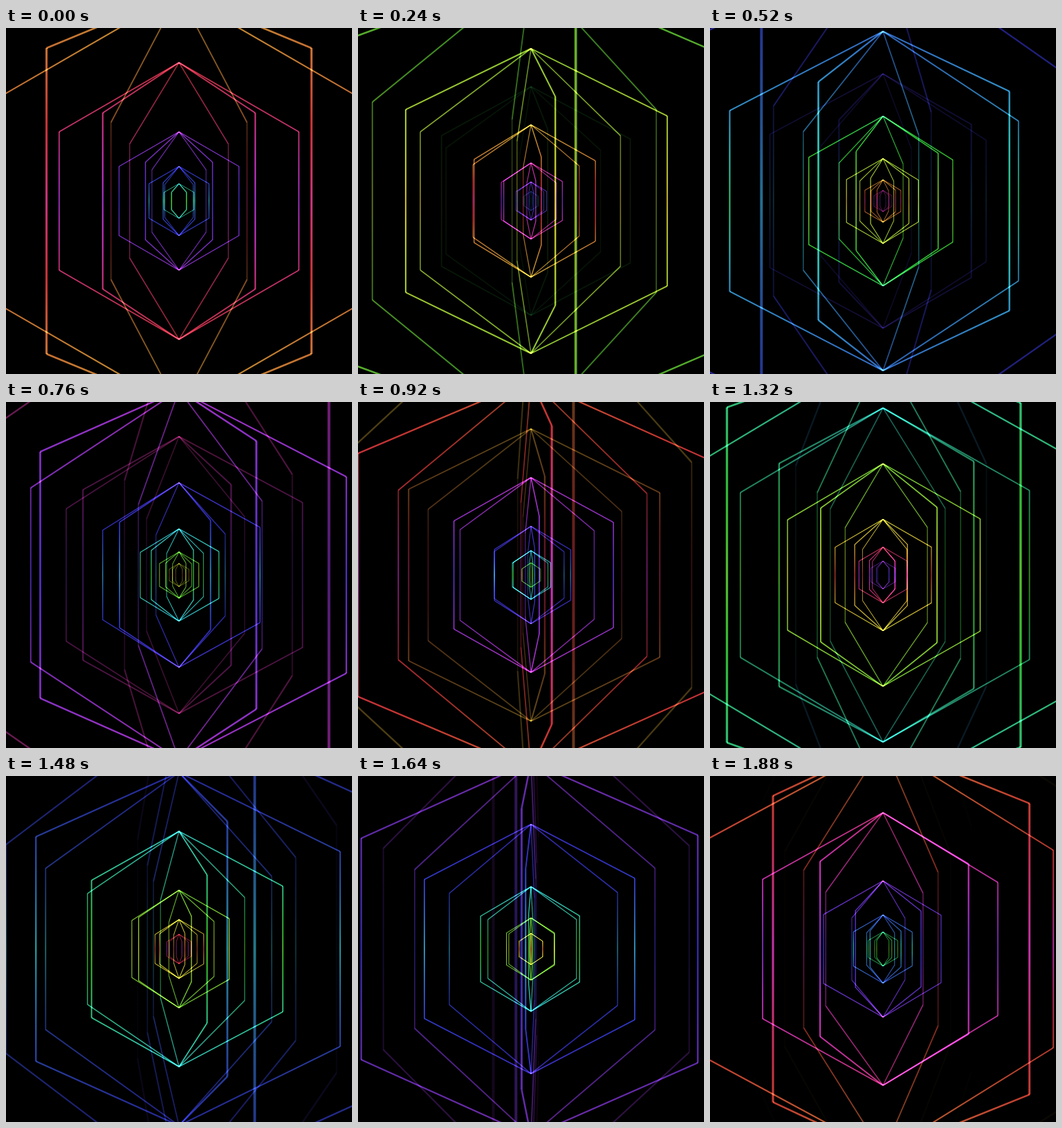
These frames come from a looping animation (500 px wide and 500 px high, 1920 ms). An HTML page with a canvas:

```html
<!DOCTYPE html>
<html lang="en">
<head>
<meta charset="utf-8">
<title>Hexagon tunnel</title>
<style>
html, body { margin: 0; width: 100%; height: 100%; overflow: hidden; background: #000; }
canvas { display: block; width: 500px; height: 500px; }
</style>
</head>
<body>
<canvas id="stage" width="500" height="500"></canvas>
<script>
const ctx = document.getElementById("stage").getContext("2d");
const LOOP = 1920, STEP = 40, CENTER = 250, DEPTH = 700;
const { sin, cos, sqrt, PI, min, max, log2, abs, hypot } = Math;

// Sizes relative to the base ring, opacity over the loop, optional hue lead.
const rings = [
  { size: 1 / 8, opacity: u => 0.8 * sqrt(u) },
  { size: 1 / 4, opacity: u => 0.8 + 0.2 * u },
  { size: 1 / 2, opacity: () => 1 },
  { size: 1, opacity: () => 1 },
  { size: 1.5, opacity: u => u, lead: u => 90 * (1 - u) },
  { size: 2, opacity: u => min(1, 3 * (1 - u)) },
  { size: 3, opacity: u => 1 - u }
];

const radians = degrees => degrees * PI / 180;

// Lingers on yellow and violet, passes quickly through cyan and red.
const warpHue = hue => hue - 14 * sin(radians(2 * (hue - 75)));

function color(phase, alpha) {
  const hue = ((warpHue(phase) % 360) + 360) % 360;
  return `hsla(${hue}, 62%, 51%, ${alpha})`;
}

function project(radius, x, y, angle, phase) {
  const near = DEPTH / max(60, DEPTH - radius * x * sin(angle));
  return {
    x: CENTER - radius * x * cos(angle) * near,
    y: CENTER + radius * y * near,
    near,
    phase: phase - 50 * (1 - abs(y)) ** 2
  };
}

function drawEdge(a, b, radius, alpha) {
  if (hypot(a.x - b.x, a.y - b.y) < 0.1) return;
  const near = (a.near + b.near) / 2;
  const strength = alpha * 0.95 * min(1, near ** 3);
  const paint = ctx.createLinearGradient(a.x, a.y, b.x, b.y);
  for (let i = 0; i <= 4; i++) {
    const k = i / 4;
    paint.addColorStop(k, color(a.phase + (b.phase - a.phase) * k, strength));
  }
  ctx.strokeStyle = paint;
  ctx.lineWidth = min(4, (0.9 + 0.004 * radius) * near);
  ctx.beginPath();
  ctx.moveTo(a.x, a.y);
  ctx.lineTo(b.x, b.y);
  ctx.stroke();
}

function drawHexagon(radius, angle, phase, alpha) {
  const at = (x, y) => project(radius, x, y, angle, phase);
  const side = sqrt(3) / 2;
  for (const x of [-side, side]) {
    const points = [at(0, -1), at(x, -0.5), at(x, 0), at(x, 0.5), at(0, 1)];
    for (let i = 1; i < points.length; i++) {
      drawEdge(points[i - 1], points[i], radius, alpha);
    }
  }
}

function draw(time) {
  const u = time / LOOP;
  const base = 100 * 2 ** (u + 0.013 * sin(2 * PI * u) + 0.013 * sin(PI * u));
  const turn = -178.2 * u;

  ctx.globalCompositeOperation = "source-over";
  ctx.fillStyle = "#000";
  ctx.fillRect(0, 0, 500, 500);
  ctx.globalCompositeOperation = "lighter";
  for (const { size, opacity, lead = () => 0 } of rings) {
    const alpha = opacity(u);
    if (alpha <= 0) continue;
    const radius = base * size;
    const phase = 720 * u - 108 + 60 * log2(radius) + lead(u);
    for (const offset of [0, 60, 120]) {
      drawHexagon(radius, radians(turn + offset), phase, alpha);
    }
  }
}

const start = performance.now();
function tick() {
  const elapsed = (performance.now() - start) % LOOP;
  draw(Math.floor(elapsed / STEP) * STEP);
  requestAnimationFrame(tick);
}
tick();
</script>
</body>
</html>
```
